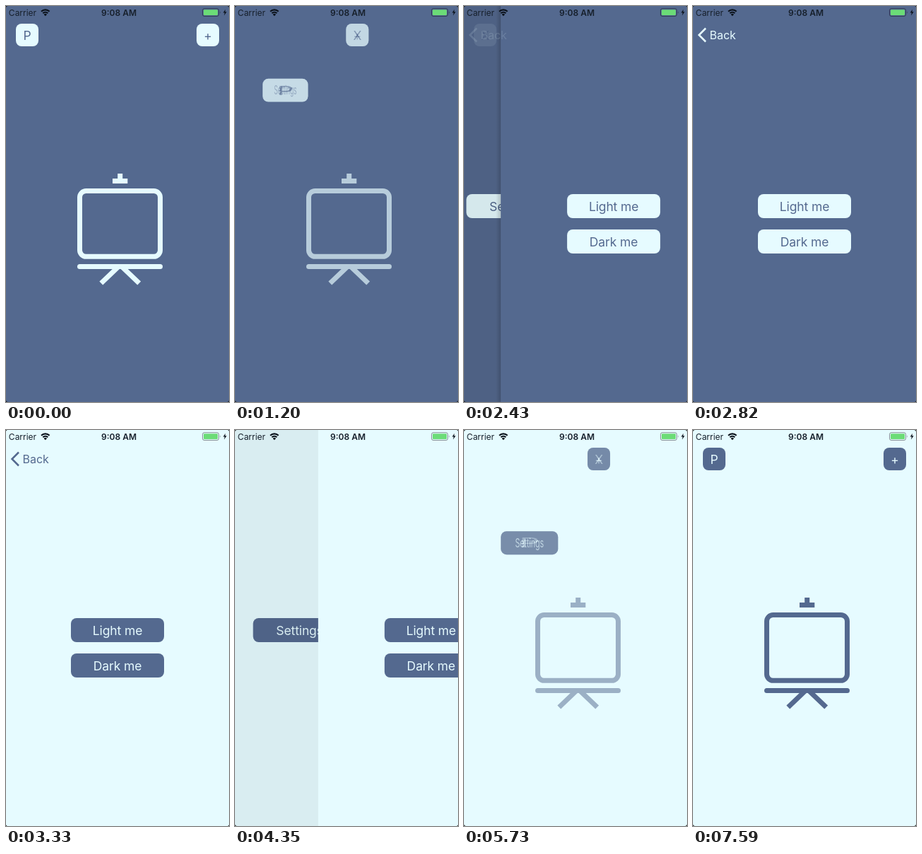
These frames come from a looping animation (316 by 560 pixels, 7.62 s). An HTML page:

```html
<!DOCTYPE html>
<html lang="en">
<meta charset="utf-8">
<title>Easel app</title>
<style>
  html, body { margin: 0; width: 100%; height: 100%; overflow: hidden; background: #111; }
  svg { display: block; width: 316px; height: 560px; border-radius: 3px; --bg: #54698f; --fg: #e6fbff; }
  svg.light { --bg: #e6fbff; --fg: #54698f; }
  text { font: 17.5px Inter, Roboto, sans-serif; letter-spacing: -.12px; text-anchor: middle; }
  .bg, .button text { fill: var(--bg); }
  .button rect, #back text { fill: var(--fg); }
  .line { fill: none; stroke: var(--fg); stroke-width: 7; }
  #back text { font-size: 16px; letter-spacing: 0; text-anchor: start; }
  #status text { font-size: 12px; letter-spacing: 0; fill: #17202c; }
  #status .time { font-weight: 600; }
  #status .wifi { fill: none; stroke: #0c131c; stroke-width: 2.2; }
</style>
<svg id="stage" viewBox="0 0 316 560">
  <defs>
    <linearGradient id="shade">
      <stop stop-opacity="0"/>
      <stop offset="1" stop-opacity=".16"/>
    </linearGradient>
  </defs>
  <rect class="bg" width="316" height="560"/>
  <g id="easel" class="line">
    <path d="M161.7 237v8M151 247.5h21.3"/>
    <rect x="104.5" y="261.5" width="114" height="92.8" rx="9"/>
    <path d="M104.5 368.4h114" stroke-linecap="round"/>
    <path d="M160 368L134.8 392M163.5 368L188.7 392"/>
  </g>
  <g id="menu"></g>
  <rect id="dim" width="316" height="560"/>
  <g id="settings">
    <rect id="shadow" x="-9" width="7" height="560" fill="url(#shade)"/>
    <rect class="bg" x="-2" width="320" height="560"/>
  </g>
  <g id="nav"></g>
  <g id="back">
    <path class="line" d="M18 31.5L8.5 41L18 50.5" style="stroke-width:2.5"/>
    <text x="23.5" y="46.8">Back</text>
  </g>
  <g id="status">
    <text x="23.5" y="13.5">Carrier</text>
    <text x="160" y="13.5" class="time">9:08 AM</text>
    <path class="wifi" d="M50 7.7a8.4 8.4 0 0 1 11.6 0M52.3 10.2a5 5 0 0 1 7 0"/>
    <path d="M55.8 14.2l-2.2-2.3a3 3 0 0 1 4.4 0z" fill="#0c131c"/>
    <rect x="278.5" y="3.7" width="23" height="10.8" rx="2.5" fill="none" stroke="#000" stroke-opacity=".42"/>
    <rect x="280" y="5.2" width="20" height="7.8" rx="1.2" fill="#6bdc77"/>
    <path d="M303 7.3q1.5 1.8 0 3.6z" fill-opacity=".45"/>
    <path d="M311 4.8l-3.3 4.8h2.2l-.9 3.8 3.7-5.2h-2.3z" fill="#0c131c"/>
  </g>
</svg>
<script>
const LOOP = 7620, WIDTH = 316;
const $ = id => document.getElementById(id);
const clamp = x => Math.min(1, Math.max(0, x));

function add(parent, tag, attrs = {}) {
  const el = document.createElementNS('http://www.w3.org/2000/svg', tag);
  set(el, attrs);
  return parent.appendChild(el);
}

function set(el, attrs) {
  for (const key in attrs) el.setAttribute(key, attrs[key]);
}

// A button whose label stretches along with its box
function button(parent, label, home) {
  const g = add(parent, 'g', { class: 'button' });
  const rect = add(g, 'rect', { rx: 8 });
  const text = add(g, 'text', { y: 6.5 });
  text.textContent = label;
  return ([x, y, width, height] = home, opacity = 1) => {
    set(g, { opacity });
    set(rect, { x, y, width, height });
    set(text, { transform:
      `translate(${x + width / 2} ${y + height / 2}) scale(${width / home[2]} ${height / home[3]})` });
  };
}

// Two buttons that morph into each other
function morph(parent, labelA, boxA, labelB, boxB) {
  const a = button(parent, labelA, boxA), b = button(parent, labelB, boxB);
  return p => {
    const box = boxA.map((v, i) => v + (boxB[i] - v) * p);
    a(box, 1 - p);
    b(box, p);
  };
}

const left = [14, 25, 32, 32], right = [270, 25, 32, 32], middle = [92, 266, 132, 34];
const mainButton = morph($('menu'), 'P', left, 'Settings', middle);
const closeButton = morph($('nav'), '+', right, 'X', left);
button($('settings'), 'Light me', middle)();
button($('settings'), 'Dark me', [92, 316, 132, 34])();

// cubic-bezier(.4, 0, .2, 1)
function ease(x) {
  x = clamp(x);
  let lo = 0, hi = 1;
  for (let i = 0; i < 24; i++) {
    const s = (lo + hi) / 2, r = 1 - s;
    if (1.2 * s * r * r + .6 * s * s * r + s ** 3 < x) lo = s; else hi = s;
  }
  return x === 0 || x === 1 ? x : lo * lo * (3 - 2 * lo);
}

// Critically damped spring
function spring(rate, ms) {
  const u = rate * Math.max(0, ms) / 1000;
  const p = 1 - (1 + u) * Math.exp(-u);
  return p > .997 ? 1 : p;
}

function draw(t) {
  const light = t >= 3330;
  $('stage').classList.toggle('light', light);

  const open = ms => light ? 1 - ease((t - 5605) / ms) : ease((t - 1100) / ms);
  const opened = open(356);
  mainButton(opened);
  closeButton(open(309));
  set($('easel'), { opacity: 1 - opened });

  const push = t >= 2640 ? 1 : spring(20, t - 2271);
  const pop = light ? spring(18.3, t - 4279) : 0;
  const shown = light ? 1 - pop : push;
  set($('menu'), { transform: `translate(${-107 * shown})` });
  set($('dim'), { opacity: .09 * shown });
  set($('settings'), {
    transform: `translate(${WIDTH * (1 - shown)})`,
    visibility: shown > 0 ? 'visible' : 'hidden'
  });
  set($('shadow'), { opacity: light ? 0 : 1 });

  const pressed = 1 - .8 * clamp((t - 4080) / 150);
  set($('nav'), { opacity: light ? clamp((pop - .4) / .6) : clamp(1 - 1.1 * push) });
  set($('back'), { opacity: light ? pressed * clamp(1 - pop / .37) : clamp((push - .8) / .2) });
}

function tick() {
  draw(performance.now() % LOOP);
  requestAnimationFrame(tick);
}
tick();
</script>
</html>
```
